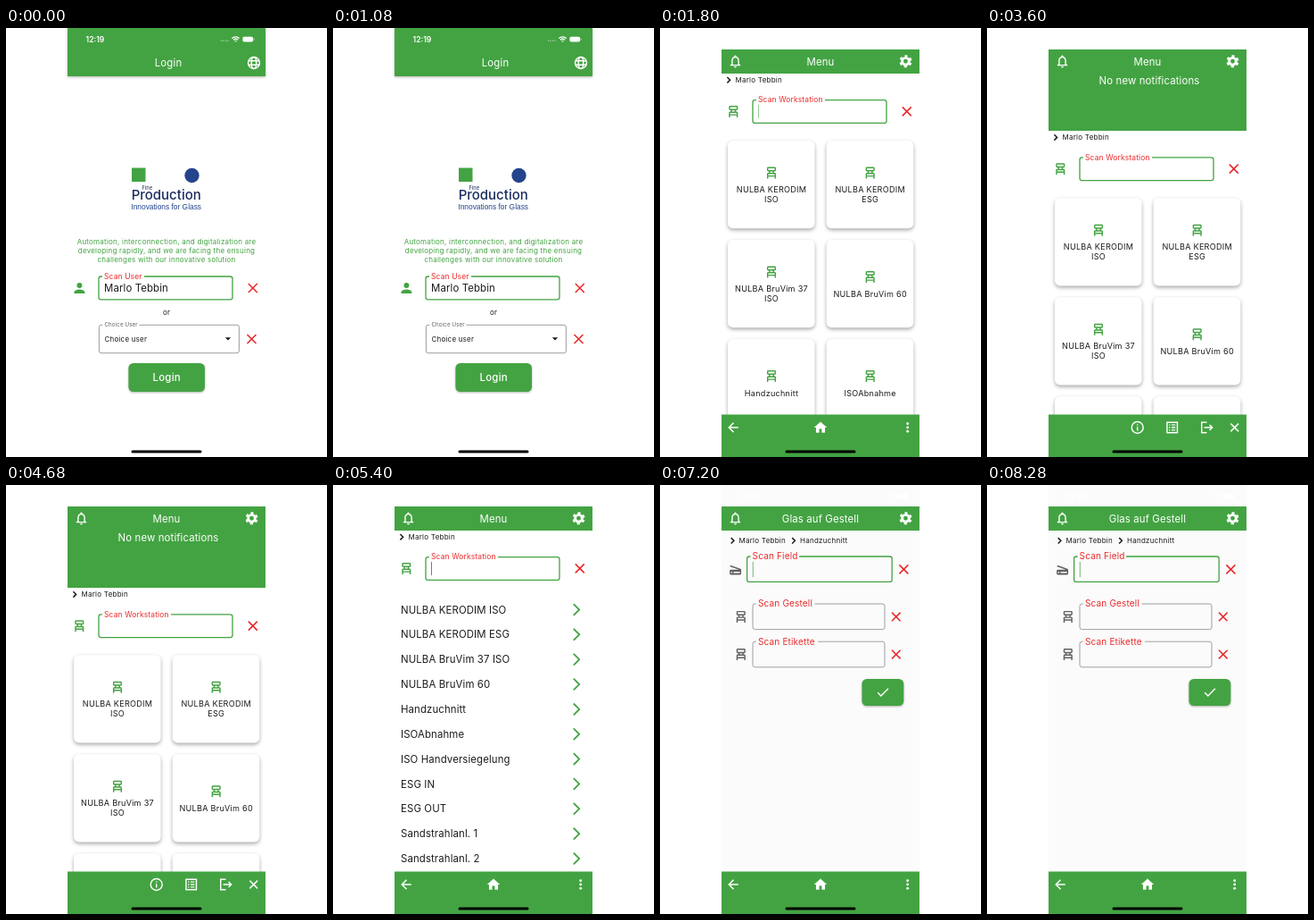
These frames come from a looping animation (360x480 px, 9000 ms). An HTML page:

```html
<!DOCTYPE html>
<html lang="en">
<head>
<meta charset="utf-8">
<title>Workstation app</title>
<style>
  html, body { margin: 0; width: 100%; height: 100%; overflow: hidden; background: #fff; }
  svg { display: block; width: 360px; height: 480px; }
  text { font-family: Inter, Roboto, sans-serif; white-space: pre; }
  .screen { display: none; }
  .screen.on { display: inline; }
  .card { fill: #fff; filter: drop-shadow(0 2.2px 2px rgba(0, 0, 0, .34)); }
  .button { filter: drop-shadow(0 1px 1px rgba(0, 0, 0, .3)); }
  .bar { filter: drop-shadow(0 1.5px 1.5px rgba(0, 0, 0, .3)); }
</style>
</head>
<body>
<svg id="stage" viewBox="0 0 360 480"></svg>
<script>
const GREEN = '#43a342', RED = '#ea2b2c', INK = '#1c1c1c', GREY = '#606060', NAVY = '#1b2c5e';
const HOLD = 1800;
const USER = 'Marlo Tebbin';
const MAKER = 'NULBA';
const STATIONS = [
  [`${MAKER} KERODIM`, 'ISO'], [`${MAKER} KERODIM`, 'ESG'],
  [`${MAKER} BruVim 37`, 'ISO'], [`${MAKER} BruVim 60`],
  ['Handzuchnitt'], ['ISOAbnahme'], ['ISO Handversiegelung'],
  ['ESG IN'], ['ESG OUT'], ['Sandstrahlanl. 1'], ['Sandstrahlanl. 2']
];

// Icons on a 24-unit grid, painted in currentColor
const solid = d => `<path fill="currentColor" fill-rule="evenodd" d="${d}"/>`;
const line = (d, w = 2) => `<path fill="none" stroke="currentColor" stroke-width="${w}" d="${d}"/>`;
const ring = (r, w, extra = '') =>
  `<circle cx="12" cy="12" r="${r}" fill="none" stroke="currentColor" stroke-width="${w}" ${extra}/>`;
const ICONS = {
  person: solid('M12 12a4 4 0 1 0 0-8 4 4 0 0 0 0 8zm0 2c-2.67 0-8 1.34-8 4v2h16v-2c0-2.66-5.33-4-8-4z'),
  globe: ring(9, 2) + line('M3.5 9h17M3.5 15h17') +
    '<ellipse cx="12" cy="12" rx="3.8" ry="9" fill="none" stroke="currentColor" stroke-width="2"/>',
  chair: line('M7 4h10a1 1 0 0 1 1 1v3a1 1 0 0 1-1 1H7a1 1 0 0 1-1-1V5a1 1 0 0 1 1-1z' +
    'M9 9v4M15 9v4M6 21v-7a1 1 0 0 1 1-1h10a1 1 0 0 1 1 1v7M6 17h12'),
  bell: solid('M12 22c1.1 0 2-.9 2-2h-4c0 1.1.9 2 2 2zm6-6v-5c0-3.07-1.63-5.64-4.5-6.32V4a1.5 1.5 0 0 0-3 0v.68' +
    'C7.64 5.36 6 7.92 6 11v5l-2 2v1h16v-1zm-2 1H8v-6c0-2.48 1.51-4.5 4-4.5s4 2.02 4 4.5z'),
  gear: ring(5.4, 4) + ring(8.2, 3.2, 'pathLength="12" stroke-dasharray="1 1" transform="rotate(15 12 12)"'),
  back: line('M20 12H5.5M12.7 4.7L5.4 12l7.3 7.3'),
  home: solid('M10 20v-6h4v6h5v-8h3L12 3 2 12h3v8z'),
  more: [6, 12, 18].map(y => `<circle cx="12" cy="${y}" r="2" fill="currentColor"/>`).join(''),
  info: ring(9, 2) + line('M12 11v6M12 7v2'),
  list: line('M4 4h16v16H4zM7 8h2M7 12h2M7 16h2M11 8h6M11 12h6M11 16h6'),
  logout: line('M12 4H4v16h8M8 12h12M16.3 7.7l4.3 4.3-4.3 4.3'),
  scanner: solid('M19.8 10.7L4.2 5l-.7 1.9L17.6 12H5a2 2 0 0 0-2 2v4c0 1.1.9 2 2 2h14a2 2 0 0 0 2-2v-5.5' +
    'c0-.8-.5-1.6-1.2-1.8zM7 17H5v-2h2zm12 0H9v-2h10z'),
  check: line('M4 12.4l5 5L20.3 6.2')
};

const icon = (name, x, y, color = '#fff', k = 0.72) =>
  `<g color="${color}" transform="translate(${x} ${y}) scale(${k}) translate(-12 -12)">${ICONS[name]}</g>`;
const text = (s, x, y, size, { fill = INK, gap = 0.12, anchor = 'start', extra = '' } = {}) =>
  `<text x="${x}" y="${y}" font-size="${size}" fill="${fill}" letter-spacing="${gap}" text-anchor="${anchor}" ${extra}>${s}</text>`;
const centered = (s, x, y, size, opts) => text(s, x, y, size, { anchor: 'middle', ...opts });
const rect = (x, y, w, h, fill, extra = '') =>
  `<rect x="${x}" y="${y}" width="${w}" height="${h}" fill="${fill}" ${extra}/>`;
const stroke = (d, color, w) => `<path d="${d}" fill="none" stroke="${color}" stroke-width="${w}"/>`;
const cross = (x, y, r = 5, color = RED, w = 1.6) =>
  stroke(`M${x - r} ${y - r}l${2 * r} ${2 * r}m0 ${-2 * r}l${-2 * r} ${2 * r}`, color, w);
const chevron = (x, y, r, color, w) => stroke(`M${x - r / 2} ${y - r}l${r} ${r}l${-r} ${r}`, color, w);
const caret = (x, y, h, alpha = 1) => rect(x, y, 1, h, GREEN, `opacity="${alpha}"`);

// Outlined input whose label interrupts the top border
function field(x, y, w, h, label, labelWidth, { size = 8.5, inset = 6, color = GREEN, line = 1.3, fill = RED, bg = '#fff' } = {}) {
  return rect(x, y, w, h, 'none', `rx="2.5" stroke="${color}" stroke-width="${line}"`) +
    rect(x + inset - 2, y - 1.5, labelWidth + 4, 3, bg) +
    text(label, x + inset, y + size * 0.34, size, { fill });
}

const statusBar = () =>
  text('12:19', 89.5, 15.8, 8.6, { fill: '#fff', gap: 0, extra: 'font-weight="600"' }) +
  [241.5, 244, 246.5, 249].map(x => `<circle cx="${x}" cy="14.3" r=".7" fill="#fff" opacity=".6"/>`).join('') +
  stroke('M253.3 11.6Q257.5 8.2 261.7 11.6M254.9 13.3Q257.5 11.2 260.1 13.3', '#fff', 1.3) +
  '<path d="M256 14.2h3l-1.5 1.6z" fill="#fff"/>' +
  rect(265.5, 9.8, 11.6, 5.6, '#fff', 'rx="1.6"') + rect(277.7, 11.6, 0.8, 2, '#fff', 'opacity=".7"');
const homeBar = () => rect(140.5, 472.4, 79, 3, '#000', 'rx="1.5"');

const header = (title, h = 27) =>
  rect(69, 24, 222, h, GREEN) + icon('bell', 84.5, 37.3) +
  centered(title, 180, 41.6, 11.4, { fill: '#fff' }) + icon('gear', 275.5, 37.3);
const footer = items => rect(69, 432.5, 222, 47.5, GREEN) + items + homeBar();
const navItems = icon('back', 82, 447) + icon('home', 180, 447) + icon('more', 277.7, 447);
const toolItems = icon('info', 168.7, 447) + icon('list', 207.7, 447) + icon('logout', 246.5, 447) +
  cross(277.7, 447, 4.4, '#fff', 1.5);

const scanHead = () =>
  chevron(77, 58.2, 3.2, INK, 1.5) + text(USER, 84.5, 61.1, 8, { gap: 0.25 }) +
  icon('chair', 82.3, 93.5, GREEN) + field(104, 80.6, 150, 25.8, 'Scan Workstation', 73) +
  cross(276.8, 93.4);

function card(lines, i) {
  const x = 76 + (i % 2) * 110.7, y = 126 + Math.floor(i / 2) * 111;
  const top = y + (lines.length > 1 ? 36 : 41.5), mid = x + 49;
  return rect(x, y, 97.6, 98.3, '#fff', 'rx="6" class="card"') + icon('chair', mid, top, GREEN) +
    lines.map((s, n) => centered(s, mid, top + 22 + n * 11, 9.1, { gap: 0.25 })).join('');
}
const grid = () => STATIONS.slice(0, 6).map(card).join('');

function login() {
  const intro = ['Automation, interconnection, and digitalization are',
    'developing rapidly, and we are facing the ensuing', 'challenges with our innovative solution'];
  return rect(69, 0, 222, 54, GREEN, 'class="bar"') + statusBar() +
    centered('Login', 182, 43.2, 11.4, { fill: '#fff', gap: 0.2 }) + icon('globe', 278, 39) +
    rect(141, 156.5, 15.5, 15.5, GREEN) + `<circle cx="208.5" cy="165" r="8.2" fill="#24448c"/>` +
    text('Fine', 152.5, 180.5, 5.8, { fill: NAVY, gap: 0 }) +
    centered('Production', 179.7, 192, 15, { fill: NAVY, gap: 0, extra: 'font-weight="500"' }) +
    centered('Innovations for Glass', 179.7, 203, 8.4,
      { fill: '#24448c', gap: 0, extra: 'style="font-family:\'Liberation Sans\',sans-serif"' }) +
    intro.map((s, i) => centered(s, 180, 241.6 + i * 10.1, 8, { fill: GREEN, gap: 0.22 })).join('') +
    icon('person', 82.4, 291, GREEN, 0.74) + field(104, 278, 150, 25.8, 'Scan User', 43) +
    text(USER, 110, 294.7, 11.4) + cross(276.8, 291) +
    centered('or', 180, 321.2, 8, { gap: 0.2 }) +
    field(104.4, 332.3, 157, 31.4, 'Choice User', 37, { size: 6.2, color: '#858585', line: 0.8, fill: GREY }) +
    text('Choice user', 110.5, 350.7, 8, { gap: 0.2 }) +
    '<path d="M245.8 346.3h6.4l-3.2 3.2z" fill="#1c1c1c"/>' + cross(275.5, 348) +
    rect(137.4, 375, 85.6, 32, GREEN, 'rx="5.5" class="button"') +
    centered('Login', 180.2, 395.1, 11.4, { fill: '#fff', gap: 0.25, extra: 'font-weight="500"' }) + homeBar();
}

const menu = () => scanHead() + caret(110, 86, 15, 0.55) + grid() + header('Menu') + footer(navItems);

const notices = () =>
  `<g transform="translate(0 64.2)">${scanHead() + grid()}</g>` + header('Menu', 91) +
  centered('No new notifications', 182, 63, 11.4, { fill: '#fff' }) + footer(toolItems);

const list = () =>
  scanHead() + caret(110, 86, 15) +
  STATIONS.map((lines, i) => {
    const y = 139.5 + i * 27.85;
    return text(lines.join(' '), 76, y + 4.1, 11.4) + chevron(273, y, 6.4, GREEN, 1.8);
  }).join('') + header('Menu') + footer(navItems);

function rack() {
  const bg = '#fbfbfb', size = 10.1;
  const row = (y, label, width) =>
    icon('chair', 90.8, y + 14.4, GREY) +
    field(104, y, 148, 28.6, label, width, { size, color: '#8a8a8a', line: 0.8, bg }) + cross(264.8, y + 14.4, 4.8);
  return rect(69, 0, 222, 480, bg) + statusBar() + header('Glas auf Gestell') +
    chevron(81.3, 62.3, 3.2, INK, 1.5) + text(USER, 88.5, 65.2, 8, { gap: 0.25 }) +
    chevron(149.8, 62.3, 3.2, INK, 1.5) + text('Handzuchnitt', 157, 65.2, 8, { gap: 0.25 }) +
    icon('scanner', 84.6, 94.8, GREY) +
    field(97.6, 80, 162.6, 28.4, 'Scan Field', 50.5, { size, bg }) + caret(103.8, 86, 17, 0.75) + cross(273.4, 94.4) +
    row(133, 'Scan Gestell', 61.5) + row(175.2, 'Scan Etikette', 65) +
    rect(226.5, 217, 46.8, 30, GREEN, 'rx="5.5" class="button"') + icon('check', 250, 232) +
    footer(navItems);
}

const stage = document.getElementById('stage');
stage.innerHTML = [login, menu, notices, list, rack].map(draw => `<g class="screen">${draw()}</g>`).join('');
const screens = [...stage.children];

function tick() {
  const now = Math.floor(performance.now() / HOLD) % screens.length;
  screens.forEach((s, i) => s.classList.toggle('on', i === now));
  requestAnimationFrame(tick);
}
tick();
</script>
</body>
</html>
```
